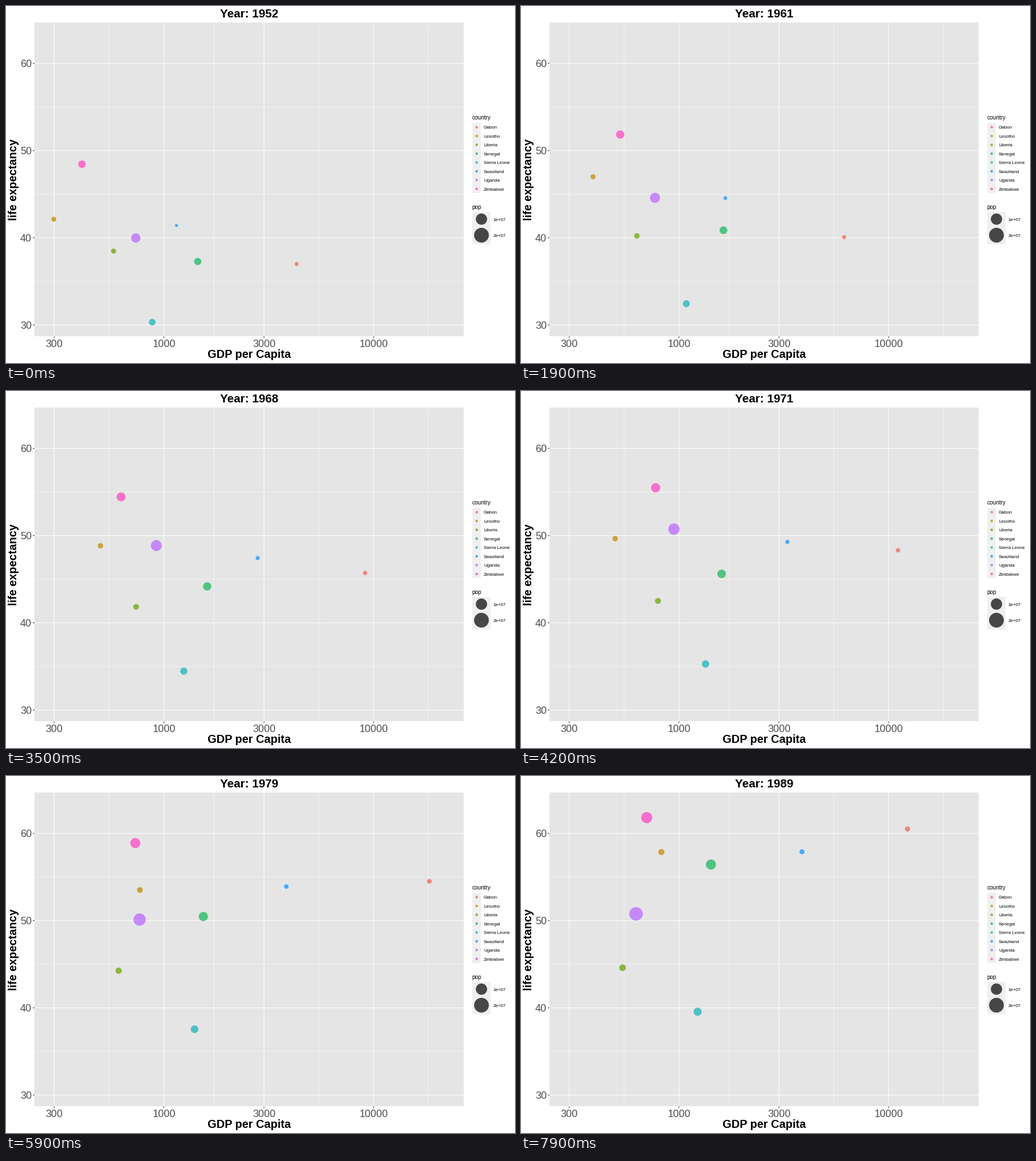
A matplotlib script that plays this animation: 894x626 px, repeating every 8000 ms.

```python
import numpy as np
import matplotlib.pyplot as plt
from matplotlib.animation import FuncAnimation
from matplotlib.patches import Circle, Rectangle

W, H, DPI = 894, 626, 100
FRAMES, INTERVAL = 80, 100
FIRST, LAST, STEPS = 1952, 2007, 119  # the full time span and its steps

COLORS = {
    "Gabon": "#F36D64",
    "Lesotho": "#C69014",
    "Liberia": "#76A914",
    "Senegal": "#2BBB67",
    "Sierra Leone": "#28B8BE",
    "Swaziland": "#259BFD",
    "Uganda": "#BD71FF",
    "Zimbabwe": "#FE52C5",
}

# One value every five years
LIFE = {
    "Gabon": [37.0, 39.0, 40.49, 44.6, 48.69, 52.79, 56.56, 60.19, 61.37],
    "Lesotho": [42.14, 45.05, 47.75, 48.49, 49.77, 52.21, 55.08, 57.18, 59.69],
    "Liberia": [38.48, 39.49, 40.5, 41.54, 42.61, 43.76, 44.85, 46.03, 40.8],
    "Senegal": [37.28, 39.33, 41.45, 43.56, 45.82, 48.88, 52.38, 55.77, 58.2],
    "Sierra Leone": [30.33, 31.57, 32.77, 34.11, 35.4, 36.79, 38.45, 40.01, 38.33],
    "Swaziland": [41.41, 43.42, 44.99, 46.63, 49.55, 52.54, 55.56, 57.68, 58.47],
    "Uganda": [39.98, 42.57, 45.34, 48.05, 51.02, 50.35, 49.85, 51.51, 48.83],
    "Zimbabwe": [48.45, 50.47, 52.36, 54.0, 55.64, 57.67, 60.36, 62.35, 60.38],
}
GDP = {
    "Gabon": [4293, 4976, 6631, 8359, 11402, 21746, 15113, 11864, 13522],
    "Lesotho": [298.8, 336, 411.8, 498.6, 496.6, 745.4, 797.3, 774, 977.5],
    "Liberia": [575.6, 621, 634.2, 713.6, 803, 640.3, 572.2, 506.1, 636.6],
    "Senegal": [1450, 1568, 1655, 1612, 1598, 1562, 1518, 1442, 1368],
    "Sierra Leone": [879.8, 1004, 1117, 1206, 1354, 1348, 1465, 1294, 1069],
    "Swaziland": [1148, 1245, 1856, 2613, 3365, 3781, 3895, 3985, 3553],
    "Uganda": [734.8, 774.4, 767.3, 908.9, 950.7, 843.7, 682.3, 617.7, 644.2],
    "Zimbabwe": [406.9, 518.8, 527.3, 569.8, 799.4, 685.6, 788.9, 706.2, 693.4],
}
# Millions of people at the start, in the middle and at the end
POP = {
    "Gabon": [0.421, 0.538, 0.909],
    "Lesotho": [0.749, 1.117, 1.655],
    "Liberia": [0.863, 1.483, 2.170],
    "Senegal": [2.756, 4.589, 7.480],
    "Sierra Leone": [2.143, 2.879, 3.976],
    "Swaziland": [0.290, 0.480, 0.829],
    "Uganda": [5.825, 10.190, 16.090],
    "Zimbabwe": [3.081, 5.861, 9.620],
}
KEYS = [round(STEPS * 5 * k / (LAST - FIRST)) for k in range(9)]
POP_KEYS = [0, KEYS[4], FRAMES - 1]


def x_pos(gdp):
    return 84.7 + 368.4 * np.log10(np.asarray(gdp) / 300)


def y_pos(life):
    return 559.4 - 15.29 * (np.asarray(life) - 30)


def radius(millions):
    return 2.7 + 12.4 * np.sqrt(max(millions - 0.29, 0) / 28.88)


plt.rcParams["font.family"] = "Liberation Sans"
fig = plt.figure(figsize=(W / DPI, H / DPI), dpi=DPI, facecolor="white")
ax = fig.add_axes([0, 0, 1, 1])
ax.set_xlim(0, W)
ax.set_ylim(H, 0)
ax.axis("off")


def px(size):
    return size * 72 / DPI


def text(x, y, s, size, color="black", ha="left", **kw):
    return ax.text(x, y, s, fontsize=px(size), color=color, ha=ha,
                   va="baseline", **kw)


def box(x0, y0, x1, y1, color):
    ax.add_patch(Rectangle((x0, y0), x1 - x0, y1 - y0, fc=color, lw=0, zorder=0))


def line(xs, ys, color="white", width=1.07):
    ax.plot(xs, ys, color=color, lw=px(width), zorder=1,
            solid_capstyle="butt", snap=False)


def dot(x, y, r, color, alpha=0.8):
    return ax.add_patch(Circle((x, y), r, fc=color, alpha=alpha, lw=0, zorder=3))


# Panel, grid and axes
L, T, R, B = 50, 29, 803.6, 579.3
box(L, T, R, B, "#E5E5E5")
for x in (181, 365.2, 549.4, 741.8):
    line([x, x], [T, B], width=0.54)
for life in (35, 45, 55):
    line([L, R], [y_pos(life)] * 2, width=0.54)
for gdp in (300, 1000, 3000, 10000):
    x = x_pos(gdp)
    line([x, x], [T, B])
    line([x, x], [B, B + 2.8], "#333333")
    text(x, 597.6, str(gdp), 18, "#4D4D4D", "center")
for life in (30, 40, 50, 60):
    y = y_pos(life)
    line([L, R], [y, y])
    line([L - 2.8, L], [y, y], "#333333")
    text(45.2, y + 6.6, str(life), 18, "#4D4D4D", "right")

text(427, 617, "GDP per Capita", 20, ha="center", weight="bold")
ax.text(19, 304.5, "life expectancy", fontsize=px(20), weight="bold",
        rotation=90, rotation_mode="anchor", ha="center", va="baseline")
title = text(427, 20, "", 20.7, ha="center", weight="bold")

# Legends
text(818.7, 198.6, "country", 10)
box(819, 204.7, 834.4, 328.4, "#EFEFEF")
for k, (name, color) in enumerate(COLORS.items()):
    y = 212.5 + 15.46 * k
    dot(826.7, y, 2.3, color)
    text(839, y + 2.9, name, 8)

text(818.7, 355.8, "pop", 10)
box(819, 361.4, 851.2, 417.9, "#EFEFEF")
for y, millions in ((373.7, 10), (401.9, 20)):
    dot(835.1, y, radius(millions), "#464646", 1)
    text(855.7, y + 2.9, f"{millions // 10}e+07", 8)

dots = {name: dot(0, 0, 1, color) for name, color in COLORS.items()}


def update(i):
    year = FIRST + (LAST - FIRST) * i / STEPS
    title.set_text(f"Year: {round(year)}")
    for name, d in dots.items():
        d.center = (np.interp(i, KEYS, x_pos(GDP[name])),
                    np.interp(i, KEYS, y_pos(LIFE[name])))
        d.radius = radius(np.exp(np.interp(i, POP_KEYS, np.log(POP[name]))))
    return [title, *dots.values()]


anim = FuncAnimation(fig, update, frames=FRAMES, interval=INTERVAL,
                     repeat=True, repeat_delay=0, blit=False)
plt.show()
```
